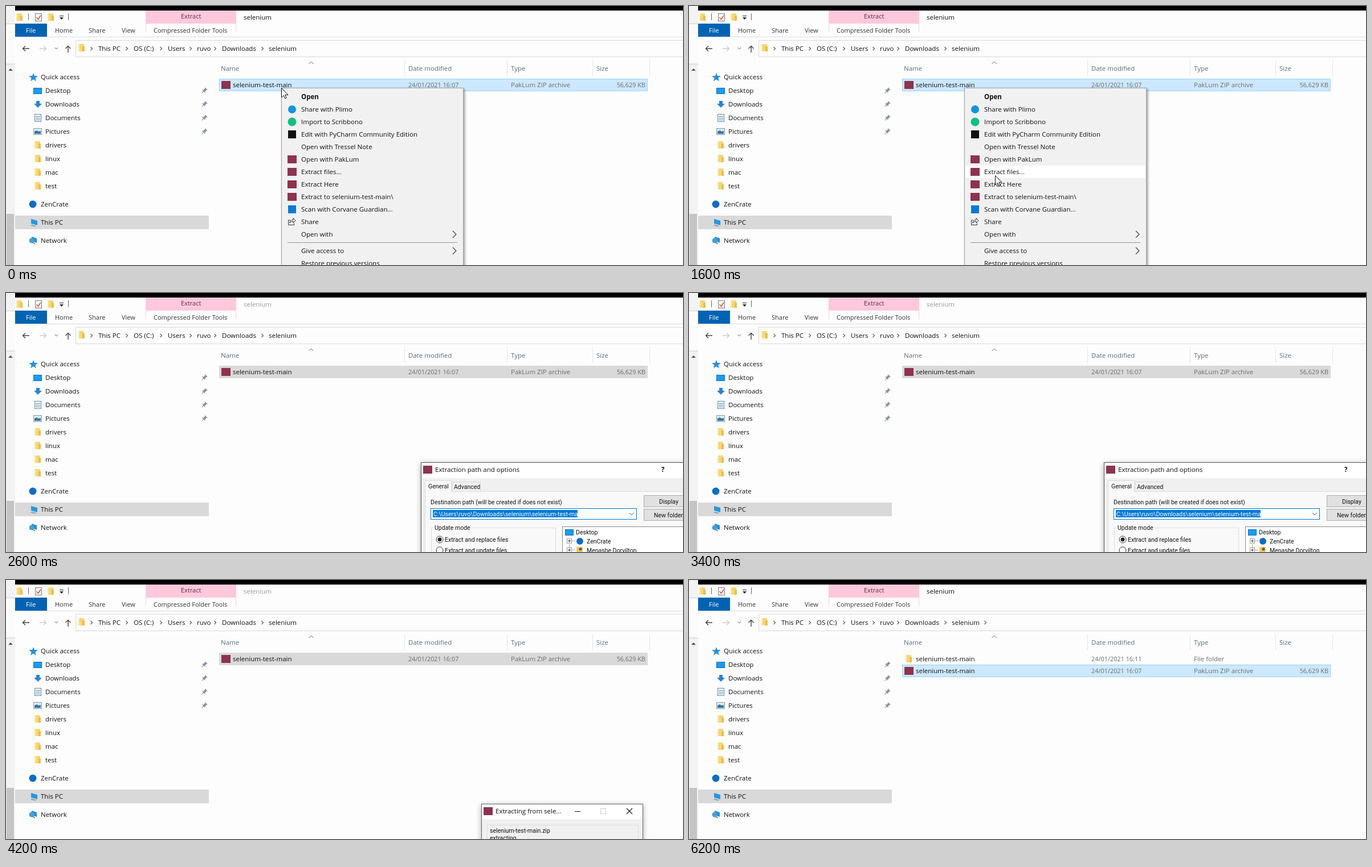
These frames come from a looping animation (1188x456 px, 7.4 s). An HTML page:

```html
<!DOCTYPE html>
<html lang="en">
<head>
<meta charset="utf-8">
<title>Extracting an archive</title>
<style>
html, body { margin: 0; width: 100%; height: 100%; overflow: hidden; background: #fdfdfd; }
svg { display: block; width: 1188px; height: 456px; }
text { font: 11.5px "Open Sans", "Noto Sans", sans-serif; white-space: pre; }
.tab { font-size: 11px; }
.meta { font-size: 10.9px; }
.bold { font-weight: 700; }
.dlg { font: 10.5px Roboto, sans-serif; }
.shadow { filter: drop-shadow(2px 2px 2px #0006); }
.glow { filter: drop-shadow(0 2px 5px #0005); }
</style>
</head>
<body>
<svg id="stage" viewBox="0 0 1188 456"></svg>
<script>
const LOOP = 7400;
const ARCHIVE = '#8d3350', CLOUD = '#0f6cc4', NAME = 'selenium-test-main';

// Drawing helpers; text is placed by its vertical centre
const rect = (x, y, w, h, fill, more = '') =>
  `<rect x="${x}" y="${y}" width="${w}" height="${h}" fill="${fill}" ${more}/>`;
const frame = (x, y, w, h, fill, stroke) =>
  rect(x + .5, y + .5, w - 1, h - 1, fill, `stroke="${stroke}"`);
const line = (d, stroke, width = 1) =>
  `<path d="${d}" fill="none" stroke="${stroke}" stroke-width="${width}"/>`;
const shape = (d, fill) => `<path d="${d}" fill="${fill}"/>`;
const dot = (x, y, r, fill) => `<circle cx="${x}" cy="${y}" r="${r}" fill="${fill}"/>`;
const text = (x, y, s, cls = '', fill = '#111', more = '') =>
  `<text x="${x}" y="${y + 4}" class="${cls}" fill="${fill}" ${more}>${s}</text>`;
const group = (id, body, cls = '') => `<g id="${id}" class="${cls}">${body}</g>`;

const folder = (x, y) =>
  rect(x, y - 7, 10, 13, '#f5d777') + rect(x + 7, y - 3, 4, 9, '#e9bd52') + rect(x, y - 7, 2, 13, '#fbe9a8');
const archive = (x, y) => rect(x, y - 7, 16, 14, ARCHIVE);
const chevron = (x, y, s = 3, color = '#555') =>
  line(`M${x - s / 2} ${y - s}l${s} ${s}l${-s} ${s}`, color, 1.1);
const arrow = (x, y, color, turn = 0) =>
  `<g transform="translate(${x} ${y}) rotate(${turn})">${line('M6 0H-5.5M-1 -4.5L-5.5 0L-1 4.5', color, 1.4)}</g>`;
const pin = y => `<g transform="translate(348 ${y}) rotate(45)">` +
  shape('M-3 -5H3V-4H2V0L4 2H.6V6H-.6V2H-4L-2 0V-4H-3z', '#8d949b') + '</g>';
const monitor = (x, y) => frame(x, y, 15, 11, '#1c9bf0', '#0a70bd');

const strip =
  rect(0, 0, 16, 456, '#f3f3f3') + rect(0, 31, 16, 1, '#cfcfcf') + rect(0, 32, 16, 68, '#fbfbfb') +
  rect(0, 102, 16, 1, '#d5d5d5') + shape('M4 114l4 -4l4 4z', '#555') + rect(1, 366, 13, 90, '#c4c4c4');

const ribbon =
  rect(16, 0, 1172, 8, '#000') +
  folder(18, 20) + rect(39, 13, 1, 12, '#666') +
  frame(51, 13, 12, 14, '#fff', '#777') + line('M53.5 20l3 3.5l4.5 -7', '#d6492f', 1.5) +
  folder(73, 20) + rect(94, 17, 7, 1, '#222') + shape('M94 20h7l-3.5 4z', '#222') + rect(109, 13, 1, 12, '#666') +
  rect(245, 8, 159, 23, '#ffc8db') + rect(245, 31, 1, 15, '#ead5dc') + rect(403, 31, 1, 15, '#ead5dc') +
  text(307, 18, 'Extract', 'tab', '#5b2c3d') +
  rect(16, 54, 1172, 1, '#dcdcdc') + rect(16, 31, 56, 23, '#0063b1') +
  text(35, 43, 'File', 'tab', '#fff') +
  [[86, 'Home'], [145, 'Share'], [203, 'View'], [259, 'Compressed Folder Tools']]
    .map(([x, s]) => text(x, 43, s, 'tab', '#333')).join('');

const address =
  arrow(35, 75, '#444') + arrow(65, 75, '#ccc', 180) + arrow(109, 76, '#444', 90) +
  line('M85.5 73l2.8 3l2.8 -3', '#666') +
  line('M1188 60.5H122.5V89.5H1188', '#d9d9d9') + folder(127, 74) +
  [150, 212, 272, 324, 367, 450].map(x => chevron(x, 75)).join('') +
  [[162, 'This PC'], [224, 'OS (C:)'], [284, 'Users'], [335, 'ruvo'], [379, 'Downloads'], [461, 'selenium']]
    .map(([x, s]) => text(x, 75, s)).join('');

const sidebar =
  shape('M48 118l2 5l6 .3l-4.7 3.6l1.7 5.6l-5 -3.2l-5 3.2l1.7 -5.6l-4.7 -3.6l6 -.3z', '#2b8ed6') +
  text(61, 125, 'Quick access') +
  ['Desktop', 'Downloads', 'Documents', 'Pictures', 'drivers', 'linux', 'mac', 'test'].map((s, i) => {
    const y = 149 + 24 * i;
    const extra = i < 4 ? pin(y) : folder(50, y);
    return text(69, y, s) + extra;
  }).join('') +
  monitor(48, 144) +
  shape('M53 167h6v5h4l-7 7l-7 -7h4z', '#2b84cc') +
  frame(50, 190, 12, 14, '#f4f8fb', '#6f8797') + line('M52 194.5h8M52 197.5h8M52 200.5h8', '#4a8fc0') +
  frame(48, 215, 15, 12, '#d7ebf7', '#8a9aa5') + shape('M50 225v-4l4 -2l3 2l4 -1v5z', '#3d7398') +
  dot(47, 349, 6.5, CLOUD) + text(61, 349, 'ZenCrate') +
  rect(16, 369, 340, 24, '#d9d9d9') +
  shape('M44 375l11 3v8l-11 -3z', '#2a96dc') + shape('M45 385l8 2l-2 1.5l-8 -2z', '#8a9ba8') + text(61, 381, 'This PC') +
  shape('M45 406l9 3v8l-9 -3z', '#2a8fd0') + dot(45, 413, 4.5, '#4a9fd0') + line('M46 416l5 3', '#68808f', 1.5) +
  text(61, 413, 'Network');

const headings =
  [[377, 'Name'], [706, 'Date modified'], [886, 'Type'], [1036, 'Size']]
    .map(([x, s]) => text(x, 110, s, '', '#5a6b80')).join('') +
  [699, 879, 1029, 1129].map(x => rect(x, 96, 1, 27, '#e3e3e3')).join('') +
  line('M531.5 102l4 -4l4 4', '#666');

const details = (y, time, kind, size = '') =>
  text(398, y, NAME) + text(706, y, '24/01/2021 ' + time, 'meta', '#6d6d6d') +
  text(886, y, kind, '', '#6d6d6d') + text(1122, y, size, 'meta', '#6d6d6d', 'text-anchor="end"');
const zipRow = y => archive(378, y) + details(y, '16:07', 'PakLum ZIP archive', '56,629 KB');
const blueBar = y => frame(374, y - 11, 752, 22, '#cce8ff', '#99d1ff');

const rows =
  group('blue', blueBar(139)) + group('grey', rect(374, 128, 752, 22, '#d9d9d9')) +
  group('before', zipRow(139)) +
  group('after', folder(380, 139) + details(139, '16:11', 'File folder') + blueBar(160) + zipRow(160));

const items = ['Open', 'Share with Plimo', 'Import to Scribbono', 'Edit with PyCharm Community Edition',
  'Open with Tressel Note', 'Open with PakLum', 'Extract files...', 'Extract Here', `Extract to ${NAME}\\`,
  'Scan with Corvane Guardian...', 'Share', 'Open with'];
const menu =
  `<g class="shadow">${frame(483, 144, 320, 330, '#f1f1f2', '#a3a3a3')}</g>` +
  rect(485, 0, 315, 22, '#fff', 'id="hover"') +
  items.map((s, i) => text(518, 160 + 22 * i, s, i ? '' : 'bold')).join('') +
  dot(502, 182, 7, '#1595dc') + dot(502, 204, 7.5, '#15bd85') + rect(495, 219, 14, 14, '#111') +
  [270, 292, 314, 336].map(y => archive(494, y)).join('') + rect(495, 351, 14, 14, '#0f78d4') +
  line('M499 377h-3.5v8.5h10v-3M497.500 382q1 -5.500 6.500 -5.500v-3l4 4.500l-4 4v-3q-4 0 -6.500 3z', '#333') +
  chevron(787, 402, 6, '#333') + rect(494, 416, 298, 1, '#919191') +
  text(518, 431, 'Give access to') + chevron(787, 431, 6, '#333') + text(518, 453, 'Restore previous versions');

const button = (y, x, s) => frame(1119, y, 80, 21, '#e1e1e1', '#adadad') + text(x, y + 11, s, 'dlg');
const radio = y => `<circle cx="761" cy="${y}" r="6" fill="#fff" stroke="#333"/>`;
const expander = y => frame(984, y - 5, 9, 9, '#fff', '#999') + line(`M986 ${y - .5}h5M988.5 ${y - 3}v5`, '#444');
const options =
  `<g class="glow">${frame(728, 298, 480, 180, '#f0f0f0', '#555')}</g>` +
  rect(729, 299, 459, 27, '#fff') + archive(732, 311) + text(753, 311, 'Extraction path and options') +
  text(1150, 311, '?', 'bold') +
  frame(782, 332, 51, 18, '#f0f0f0', '#d9d9d9') + frame(735, 349, 480, 120, '#f9f9f9', '#dcdcdc') +
  line('M735.500 350V330.500H781.500V350', '#dcdcdc') + rect(736, 331, 45, 20, '#f9f9f9') +
  text(741, 340, 'General', 'dlg') + text(786, 341, 'Advanced', 'dlg') +
  text(745, 368, 'Destination path (will be created if does not exist)', 'dlg') +
  frame(745, 379, 362, 20, '#fff', '#0078d7') + rect(749, 382, 254, 13, '#0078d7') +
  text(750, 389, `C:\\Users\\ruvo\\Downloads\\selenium\\${NAME}`, 'dlg', '#fff') +
  line('M1094 387l4 4l4 -4', '#555') +
  button(356, 1146, 'Display') + button(380, 1137, 'New folder') +
  frame(746, 413, 219, 60, 'none', '#dcdcdc') + rect(750, 408, 66, 10, '#f9f9f9') + text(752, 413, 'Update mode', 'dlg') +
  radio(434) + dot(761, 434, 3.5, '#222') + text(770, 434, 'Extract and replace files', 'dlg') +
  radio(453) + text(770, 453, 'Extract and update files', 'dlg') +
  frame(976, 411, 230, 60, '#fff', '#888') +
  monitor(981, 416) + text(1000, 421, 'Desktop', 'dlg') +
  expander(437) + line('M988.5 442v6M993 436.500h6M993 452.500h6', '#aaa') + dot(1007, 437, 6, CLOUD) + text(1019, 437, 'ZenCrate', 'dlg') +
  expander(453) + rect(1001, 447, 11, 10, '#f0c95f') + dot(1008, 451, 2.500, '#555') + text(1019, 453, 'Menashe Dorvilton', 'dlg');

const progress =
  `<g class="glow">${frame(834, 394, 284, 80, '#f0f0f0', '#666')}</g>` +
  rect(835, 395, 282, 26, '#fff') + archive(838, 407) + text(859, 407, 'Extracting from sele...') +
  rect(998, 407, 10, 1, '#111') + frame(1043, 402, 10, 10, 'none', '#ccc') +
  line('M1089 402l10 10M1099 402l-10 10', '#111', 1.1) +
  frame(844, 431, 266, 40, 'none', '#dcdcdc') +
  text(849, 441, NAME + '.zip', 'dlg') + text(849, 454, 'extracting', 'dlg');

const pointer = '<path d="M.5 .5V17L4.300 13.500L6.800 19L9.200 18L6.800 12.500H12z" fill="#fff" stroke="#111" stroke-linejoin="round"/>';

document.getElementById('stage').innerHTML =
  rect(0, 0, 1188, 456, '#fdfdfd') + strip + ribbon + text(417, 20, 'selenium', '', '#111', 'id="title"') +
  address + group('crumb', chevron(520, 75)) + sidebar + headings + rows +
  group('menu', menu) + group('options', options) + group('progress', progress) + group('pointer', pointer);

// When each part is visible: [from, to) in ms
const spans = {
  blue: [0, 1800], grey: [1800, 4800], before: [0, 4800], after: [4800, LOOP], menu: [0, 1800],
  options: [2400, 3800], progress: [4000, 4800], crumb: [5200, LOOP]
};
const stops = [[0, 483, 144], [200, 498, 195], [400, 520, 270], [600, 532, 312], [800, 532, 307],
  [1000, 540, 311], [1600, 537, 298], [2600, -50, -50], [6000, 544, 454], [6200, -50, -50]];
const el = id => document.getElementById(id);
const show = (id, on) => el(id).setAttribute('visibility', on ? 'visible' : 'hidden');

function draw(now) {
  const t = now % LOOP;
  for (const [id, [from, to]] of Object.entries(spans)) show(id, t >= from && t < to);
  el('title').setAttribute('fill', t >= 1800 && t < 4800 ? '#999' : '#111');
  const [, x, y] = stops.findLast(s => s[0] <= t);
  el('pointer').setAttribute('transform', `translate(${x} ${y})`);
  const row = Math.floor((y - 149) / 22);
  el('hover').setAttribute('y', 149 + 22 * row);
  show('hover', t < 1800 && row >= 0);
  requestAnimationFrame(() => draw(performance.now() - start));
}
const start = performance.now();
draw(0);
</script>
</body>
</html>
```
